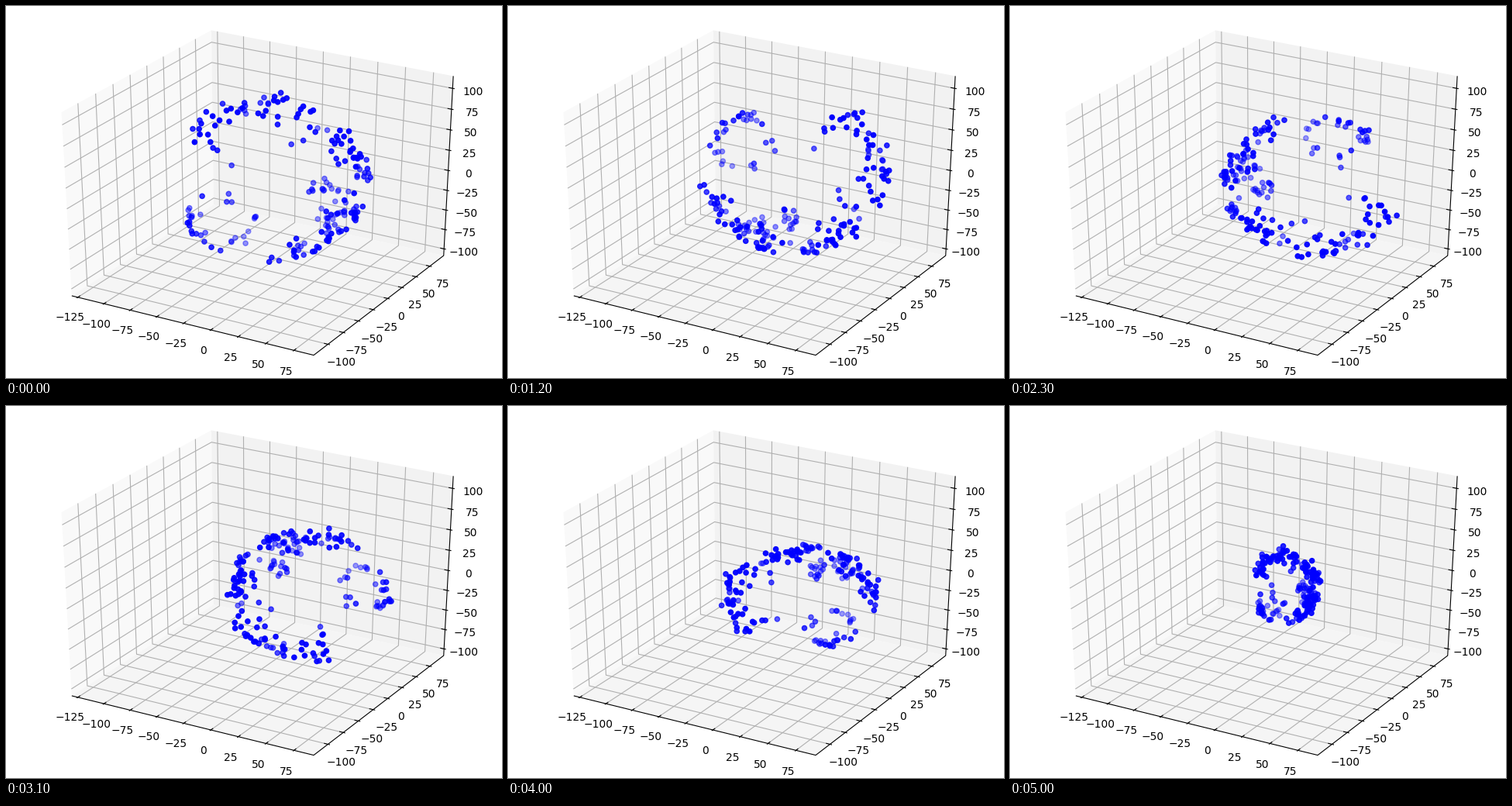
These frames come from a looping animation (640 px wide and 480 px high, 5.1 s). A matplotlib script:

```python
import numpy as np
import matplotlib.pyplot as plt
from matplotlib.animation import FuncAnimation

W, H = 640, 480
FRAMES, STEP = 51, 100
EDGE = 0.5 + 1 / 48      # half side of the box, with a small margin
LABEL = EDGE + 0.057     # how far out the tick labels sit
DIST = 10

SPAN = 214.4
LOWS = (-126.4, -118.4, -104.3)
TICKS = (range(-125, 76, 25), range(-100, 76, 25), range(-100, 101, 25))


def project(points):
    """Perspective view of the unit box, elevation 30, azimuth -60, in pixels."""
    el, az = np.radians([30, -60])
    ce, se, ca, sa = np.cos(el), np.sin(el), np.cos(az), np.sin(az)
    right = np.array([-sa, ca, 0])
    up = np.array([-se * ca, -se * sa, ce])
    toward = np.array([ce * ca, ce * sa, se])
    p = np.asarray(points, float)
    depth = DIST - p @ toward
    x = (p @ right / depth + 0.095) / 0.185 * W
    y = H - (p @ up / depth + 0.095) / 0.185 * H
    return np.column_stack([x, y])


fig = plt.figure(figsize=(W / 100, H / 100), dpi=100, facecolor="white")
ax = fig.add_axes([0, 0, 1, 1])
ax.set_xlim(0, W)
ax.set_ylim(H, 0)
ax.axis("off")


def line(points, color, z):
    ax.plot(*project(points).T, color=color, lw=0.8, zorder=z,
            solid_capstyle="butt")


def draw_box():
    e = EDGE
    panes = [
        ([(-e, -e, -e), (-e, e, -e), (-e, e, e), (-e, -e, e)], "0.975"),
        ([(-e, e, -e), (e, e, -e), (e, e, e), (-e, e, e)], "0.95"),
        ([(-e, -e, -e), (e, -e, -e), (e, e, -e), (-e, e, -e)], "0.9625"),
    ]
    for corners, color in panes:
        ax.fill(*project(corners).T, color=color, lw=0, zorder=1)
    line([(-e, -e, -e), (e, -e, -e), (e, e, -e), (e, e, e)], "black", 3)


def draw_ticks():
    e, m = EDGE, LABEL
    # per axis: grid path, tick anchor, tick direction, label anchor
    layout = [
        ([(0, -e, -e), (0, e, -e), (0, e, e)], (0, -e, -e), (0, -1, 0), (0, -m, -m)),
        ([(e, 0, -e), (-e, 0, -e), (-e, 0, e)], (e, 0, -e), (1, 0, 0), (m, 0, -m)),
        ([(-e, -e, 0), (-e, e, 0), (e, e, 0)], (e, e, 0), (1, 0, 0), (m, m, 0)),
    ]
    for axis, (grid, anchor, out, label) in enumerate(layout):
        for value in TICKS[axis]:
            shift = np.zeros(3)
            shift[axis] = (value - LOWS[axis]) / SPAN - 0.5
            line(grid + shift, "#b0b0b0", 2)
            base = anchor + shift
            step = np.array(out) / 12
            line([base + 0.1 * step, base - 0.2 * step], "black", 3)
            x, y = project([label + shift])[0]
            ax.text(x, y, str(value).replace("-", "\u2212"), fontsize=10,
                    family="DejaVu Sans", ha="center", va="top", zorder=4)


# Clumps of points on a broken ring: angle behind the gap, and angle in the tube
COUNT, CLUMPS, DENSE = 200, 60, 14
GAP = 22
rng = np.random.default_rng(7)
clump = rng.integers(0, CLUMPS, COUNT)
spread = (np.arange(CLUMPS) + rng.random(CLUMPS)) / CLUMPS
spread[rng.choice(CLUMPS, DENSE, replace=False)] = rng.normal(0.62, 0.06, DENSE)
along = np.clip(spread[clump] + rng.normal(0, 0.01, COUNT), 0, 1)
behind = GAP + along * (360 - 2 * GAP)
tube = rng.vonmises(0.4, 0.4, CLUMPS)[clump] + rng.normal(0, 0.35, COUNT)
reach = 0.4 + 0.6 * np.sqrt((1 + np.cos(tube)) / 2)
nearness = 0.8 * (1 + np.sin(tube + 0.5)) / 2 + 0.2 * (1 - along)
jitter = rng.normal(0, 3, (COUNT, 2))


def positions(i):
    """The ring turns clockwise once per loop, drifts, and closes up at the end."""
    s = i / (FRAMES - 1)
    bump, wave = np.sin(np.pi * s), np.sin(2 * np.pi * s)
    cx = 340 + 15 * s + 42 * bump
    cy = 222 + 10 * s + 8 * bump - 12 * wave
    rx = 128 * (1 - 0.28 * s) * (1 - 0.53 * s ** 20)
    ry = 105 * (1 - 0.57 * s ** 2)
    angle = np.radians(177 - 360 * i / FRAMES - behind)
    x = cx + rx * reach * np.cos(angle)
    y = cy - ry * reach * np.sin(angle)
    return np.column_stack([x, y]) + jitter


draw_box()
draw_ticks()
colors = np.zeros((COUNT, 4))
colors[:, 2] = 1
colors[:, 3] = 0.3 + 0.7 * nearness ** 0.7
dots = ax.scatter(*positions(0).T, s=20, c=colors, edgecolors="face",
                  linewidths=1, zorder=5)


def update(i):
    dots.set_offsets(positions(i))
    return [dots]


anim = FuncAnimation(fig, update, frames=FRAMES, interval=STEP,
                     repeat=True, repeat_delay=0)
plt.show()
```
